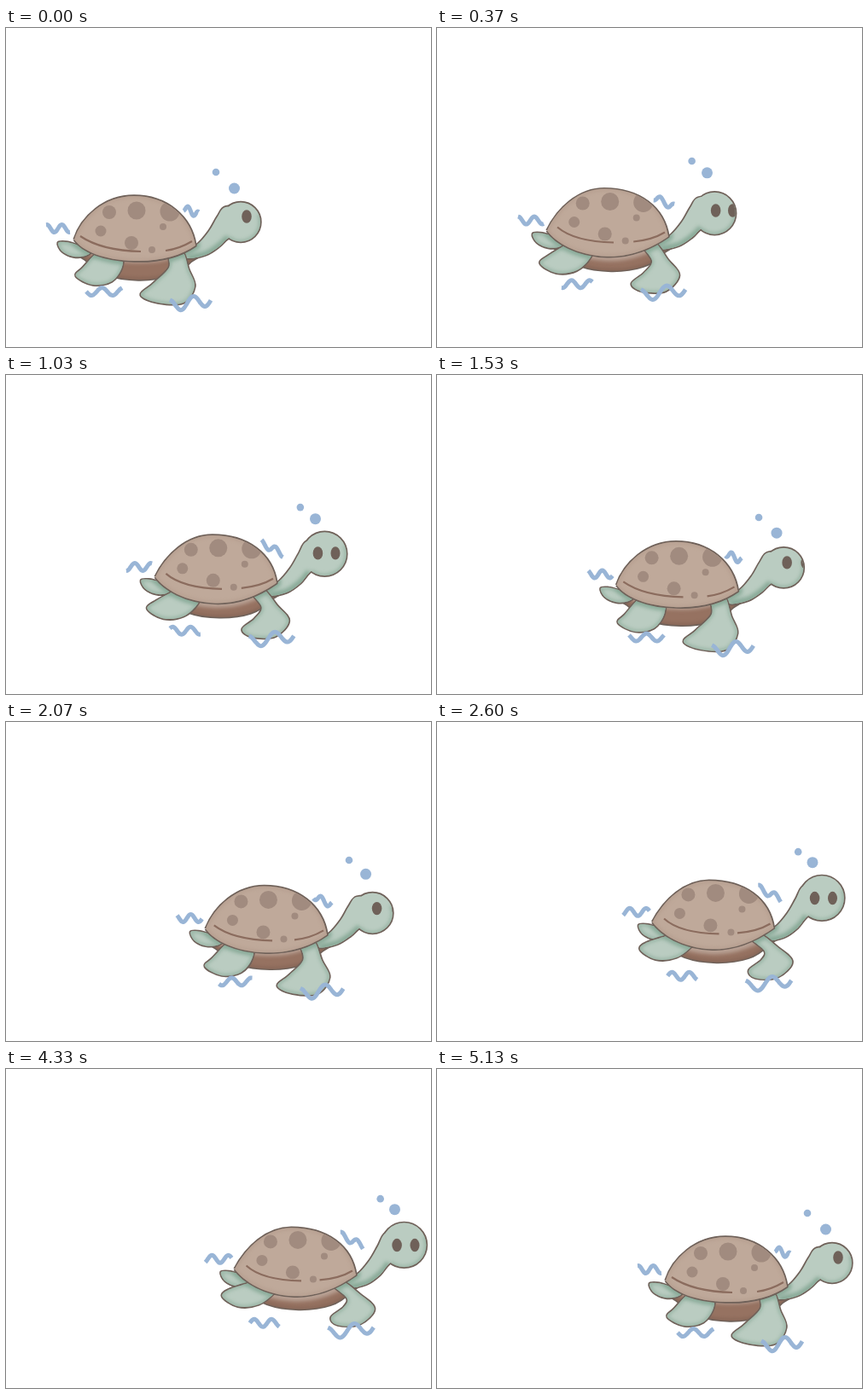
An HTML page with a canvas that plays this animation: 498x374 px, repeating every 5.26 s.

```html
<!DOCTYPE html>
<html lang="en">
<head>
<meta charset="utf-8">
<title>Swimming turtle</title>
<style>
html, body { margin: 0; width: 100%; height: 100%; overflow: hidden; background: #fff; }
canvas { display: block; }
</style>
</head>
<body>
<canvas id="stage" width="498" height="374"></canvas>
<script>
const ctx = document.getElementById('stage').getContext('2d');
const LOOP = 5260, FRAMES = 158, SLOTS = 33, CYCLE = 11;
const INK = '#6f6159', SKIN = '#baccc1', SHADE = '#8aab99', WATER = '#99b5d6', FOLD = '#8b6c5e';

// Travel to the right: [step, x]
const travel = [[0, 0], [11, 49], [16, 62], [31, 95], [46, 130.5], [64, 157], [78, 172.5], [97, 188]];

// Limbs at rest and at the top of the stroke
const backRest = [[90, 281], [82, 291], [102, 301], [124, 297], [136, 280]];
const backUp = [[74, 254], [63, 263], [81, 275], [106, 273], [126, 259]];
const frontRest = [[191, 281], [172, 300], [158, 313], [178, 322], [208, 322], [221, 303], [214, 283]];
const frontUp = [[214, 266], [213, 276], [198, 288], [204, 297], [229, 296], [247, 278], [228, 261]];

const belly = [[86, 256], [95, 273], [118, 289], [155, 295], [192, 290], [215, 275], [223, 258]];
const tail = [[61, 252], [70, 251], [82, 254], [99, 261], [93, 267], [79, 268], [66, 262]];
const spots = [[121, 216, 8], [153, 214, 10.5], [192, 215, 11.5], [111, 238, 6.5], [184, 233, 4], [147, 252, 8], [171, 260, 4]];

// x, y, and how far the point follows the head
const neck = [[208, 262, 0], [224, 254, 0], [238, 238, 0], [248, 221, 0], [257, 210, .4], [278, 212, 1],
  [280, 238, 1], [261, 246, .4], [250, 256, .1], [234, 266, 0], [213, 270, 0]];

// Ripples: middle, width (+ growth), slope, height, turns, phase, phase per slot, rise
const ripples = [
  { x: 61, y: 235, w: 28, grow: 3, slope: 0, amp: 4.5, turns: 1.6, phase: 0, drift: -.13, rise: 13 },
  { x: 217, y: 215, w: 18, grow: 9, slope: .5, amp: 4, turns: 1.5, phase: 0, drift: .13, rise: 15 },
  { x: 115, y: 309, w: 42, grow: -8, slope: 0, amp: 4.5, turns: 1.7, phase: 0, drift: .1, rise: 12 },
  { x: 216, y: 322, w: 48, grow: 6, slope: -.15, amp: 7, turns: 1.7, phase: -.22, drift: 0, rise: 17 }
];

const mix = (a, b, k) => Array.isArray(a) ? a.map((v, i) => mix(v, b[i], k)) : a + (b - a) * k;
const shift = (pts, dx, dy) => pts.map(([x, y]) => [x + dx, y + dy]);

// One swell per cycle, from 0 to 1 and back
const swell = (slot, skew, power) => Math.max(0, Math.sin(Math.PI * (slot / 10) ** skew)) ** power;

function travelX(step) {
  const i = travel.findIndex(p => p[0] > step);
  if (i < 0) return 188;
  const [a, b] = [travel[i - 1], travel[i]];
  return mix(a[1], b[1], (step - a[0]) / (b[0] - a[0]));
}

// Smooth curve through the points
function curve(pts, closed = true) {
  const path = new Path2D(), n = pts.length;
  const at = i => pts[closed ? (i + n) % n : Math.max(0, Math.min(n - 1, i))];
  path.moveTo(...pts[0]);
  for (let i = 0; i < (closed ? n : n - 1); i++) {
    const [p, a, b, q] = [at(i - 1), at(i), at(i + 1), at(i + 2)];
    path.bezierCurveTo(a[0] + (b[0] - p[0]) / 6, a[1] + (b[1] - p[1]) / 6,
      b[0] - (q[0] - a[0]) / 6, b[1] - (q[1] - a[1]) / 6, ...b);
  }
  if (closed) path.closePath();
  return path;
}

function stroke(path, color, width) {
  ctx.strokeStyle = color;
  ctx.lineWidth = width;
  ctx.stroke(path);
}

function arc(x, y, rx, ry, from = 0, to = 2 * Math.PI) {
  const path = new Path2D();
  path.ellipse(x, y, rx, ry, 0, from, to);
  return path;
}

function fill(path, color) {
  ctx.fillStyle = color;
  ctx.fill(path);
}

// Outline, fill, then soft shading inside; soft holds [path, color, width]
function solid(path, color, soft) {
  stroke(path, INK, 3.4);
  fill(path, color);
  ctx.save();
  ctx.clip(path);
  ctx.filter = 'blur(2px)';
  for (const s of soft) stroke(...s);
  ctx.restore();
}

function shellPath(lift, k) {
  const p = new Path2D(), top = 197 - lift * .8, rim = 273 - lift * .5, left = 248 - lift, right = 255 - lift;
  p.moveTo(80, left);
  p.bezierCurveTo(88 + 6 * k, left - 26, 115 + 3 * k, top, 150 - 4 * k, top);
  p.bezierCurveTo(188, top, 217, right - 34, 222, right);
  p.bezierCurveTo(205, right + 12, 180, rim + 1, 150, rim);
  p.bezierCurveTo(115, rim - 1, 90, left + 14, 80, left);
  return p;
}

function drawShell(shell, lift, k) {
  solid(shell, '#bfa99a', [[shell, '#b39b8c', 3]]);
  ctx.save();
  ctx.clip(shell);
  ctx.translate(0, -lift);
  for (const [x, y, r] of spots) fill(arc(x + k, y, r, r), '#a18b7f');
  stroke(new Path2D(`M${87 + 7 * k} 244Q112 261 158 262`), FOLD, 2.2);
  stroke(new Path2D(`M${187 - 8 * k} 261Q203 259 218 250`), FOLD, 2.2);
  ctx.restore();
}

function drawHead(slot, shell, lift) {
  const raise = 24.5 * swell(slot, .88, 2), turn = swell(slot, 1.1, 1.5);
  const x = 275 + 3.5 * turn, y = 227.5 - .88 * raise, r = 23 + raise / 8;
  const pts = neck.map(([px, py, w]) => [px, py - mix(lift, raise, w)]);
  const both = curve(pts);
  both.addPath(arc(x, y, r, r));
  solid(both, SKIN, [
    [arc(x, y, r, r, -.4, 2.2), SHADE, 3],
    [curve(pts.slice(7), false), SHADE, 9],
    [shell, SHADE, 11]
  ]);
  ctx.save();
  ctx.clip(both);
  const eyeY = 221 - .6 * raise;
  fill(arc(282 - 12 * turn, eyeY, 5.8, 7.7), INK);
  fill(arc(291 + 16 * (1 - turn) ** 2, eyeY, 5.5, 7.7), INK);
  ctx.restore();
}

function drawRipple(r, slot, k) {
  const pts = [], width = r.w + r.grow * k;
  for (let u = 0; u <= 1.001; u += .05) {
    const dx = (u - .5) * width;
    const angle = 2 * Math.PI * (r.turns * u + r.phase + r.drift * slot);
    pts.push([r.x + dx, r.y - r.rise * k + dx * r.slope + r.amp * Math.sin(angle)]);
  }
  stroke(curve(pts, false), WATER, 5);
}

function drawTurtle(slot) {
  const k = swell(slot, .75, 1.5), kick = k * k, lift = 14.5 * k;
  const shell = shellPath(lift, k);
  const limb = pts => {
    const path = curve(pts);
    solid(path, SKIN, [[path, SHADE, 3], [shell, SHADE, 11]]);
  };

  const under = curve(shift(belly, 0, -lift));
  solid(under, '#967261', [[under, '#7f6052', 3], [shell, '#b8a194', 5 + 8 * k]]);
  limb(shift(tail, 3 * k, -lift));
  drawHead(slot, shell, lift);
  limb([[110, 262 - lift], ...mix(backRest, backUp, kick), [134, 263 - lift]]);
  limb([[191, 264 - lift], ...mix(frontRest, frontUp, kick), [207, 263 - lift]]);
  drawShell(shell, lift, k);

  for (const r of ripples) drawRipple(r, slot, k);
  fill(arc(267.5, 188 - 25 * k, 6.5, 6.5), WATER);
  fill(arc(246 + 5 * k, 169 - 18 * k, 4.3, 4.3), WATER);
}

function draw(now) {
  const step = Math.floor((now % LOOP + 3.4) * .03) % FRAMES;
  const slot = Math.floor((step - .25) * SLOTS / FRAMES);
  ctx.fillStyle = '#fff';
  ctx.fillRect(0, 0, 498, 374);
  ctx.save();
  ctx.lineJoin = 'round';
  ctx.translate(travelX(step), 0);
  drawTurtle((slot + CYCLE) % CYCLE);
  ctx.restore();
}

const start = performance.now();
function tick() {
  draw(performance.now() - start);
  requestAnimationFrame(tick);
}
tick();
</script>
</body>
</html>
```
